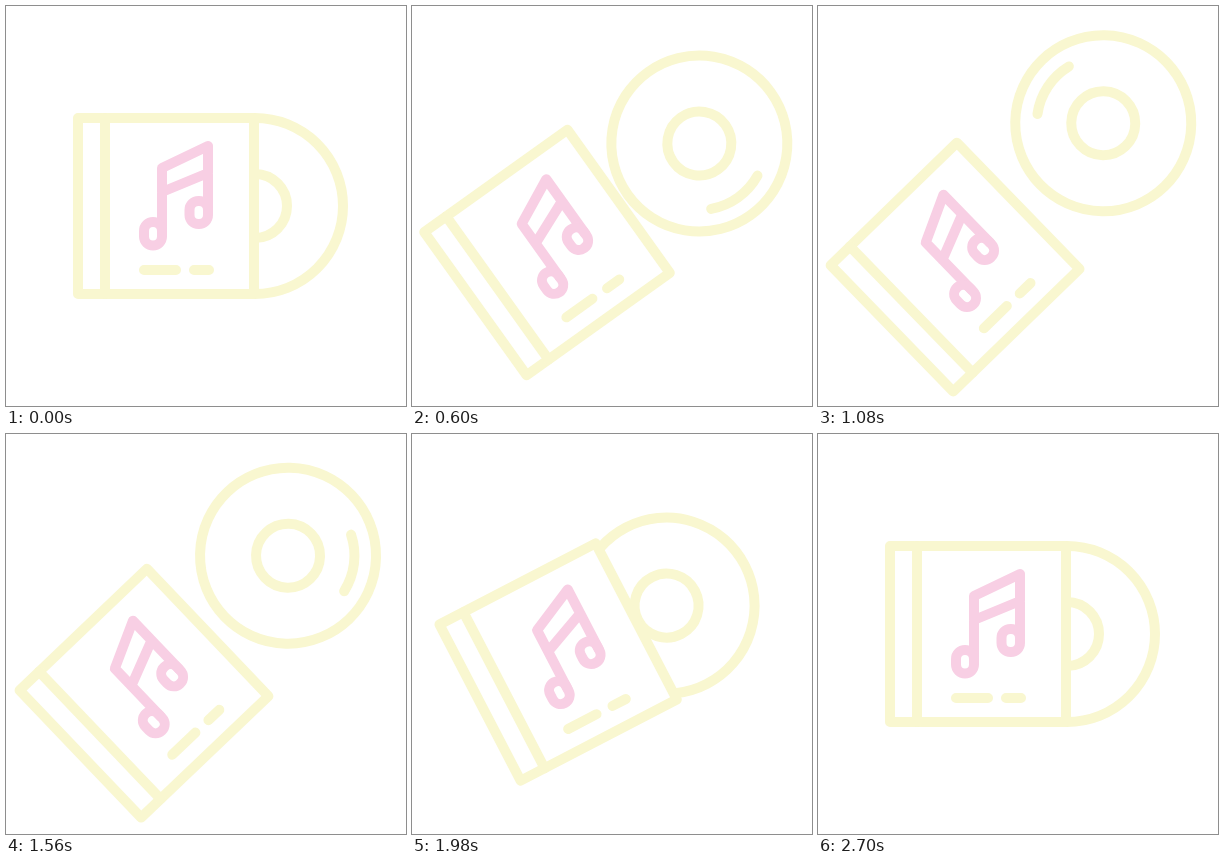
These frames come from a looping animation (400x400 px, 4.73 s). An HTML page:

```html
<!DOCTYPE html>
<html lang="en">
<head>
<meta charset="utf-8">
<title>Music album</title>
<style>
  html, body { margin: 0; height: 100%; overflow: hidden; background: #fff; }
  svg { display: block; width: 100vw; height: 100vh; }
  g { fill: none; stroke: #f9f7d0; stroke-width: 10; stroke-linecap: round; stroke-linejoin: round; }
  #note { stroke: #f8cfe4; }
</style>
</head>
<body>
<svg viewBox="0 0 400 400">
  <g id="album">
    <g id="disc">
      <circle r="88"/>
      <circle r="32"/>
      <path id="shine" d="M60-28.5A66.5 66.5 0 0 1 60 28.5"/>
    </g>
    <g id="box">
      <path fill="#fff" d="M-88-88H88V88H-88Z"/>
      <path d="M-61-88V88M-22 64H10M28 64H43"/>
      <g id="note">
        <path d="M-4 28V-38L42-60V7M-4-14L42-33"/>
        <rect x="-22" y="16" width="18" height="23.5" rx="9"/>
        <rect x="23.5" y="-5" width="18.5" height="23" rx="9"/>
      </g>
    </g>
  </g>
</svg>
<script>
const LOOP = 4730, STEP = 30, OPEN = 1350, SHUT = 2270, END = 2700;
const el = id => document.getElementById(id);
const [album, disc, shine, box] = ["album", "disc", "shine", "box"].map(el);

// Cubic Bezier easing with handles (a, 0) and (b, 1)
function ease(x, [a, b]) {
  let lo = 0, hi = 1, s;
  for (let i = 0; i < 24; i++) {
    s = (lo + hi) / 2;
    const r = 1 - s;
    if (3 * r * r * s * a + 3 * r * s * s * b + s ** 3 < x) lo = s; else hi = s;
  }
  return s * s * (3 - 2 * s);
}

// Rest, open, overshoot when closing, and the two easings
const angle = { rest: 0, open: -45, over: 3.6, out: [.27, .1], back: [.85, .86] };
const boxX = { rest: -40, open: -88.5, over: -51.5, out: [.2, .05], back: [.52, .6] };
const discX = { rest: 49, open: 120, over: 24, out: [.2, .05], back: [.51, .8] };

function value(m, t) {
  const move = (t0, t1, from, to, e) => from + (to - from) * ease((t - t0) / (t1 - t0), e);
  if (t <= 0 || t >= END) return m.rest;
  if (t < OPEN) return move(0, OPEN, m.rest, m.open, m.out);
  if (t < SHUT) return move(OPEN, SHUT, m.open, m.over, m.back);
  return move(SHUT, END, m.over, m.rest, [.27, .1]);
}

function draw(t) {
  const spin = -135 + 720 * (1 - Math.max(0, 1 - t / SHUT) ** 1.22);
  album.setAttribute("transform", `translate(200 200) rotate(${value(angle, t)})`);
  box.setAttribute("transform", `translate(${value(boxX, t)} 0)`);
  disc.setAttribute("transform", `translate(${value(discX, t)} 0)`);
  shine.setAttribute("transform", `rotate(${spin})`);
}

let start;
function tick(now) {
  start ??= now;
  draw(Math.floor((now - start) % LOOP / STEP) * STEP);
  requestAnimationFrame(tick);
}
draw(0);
requestAnimationFrame(tick);
</script>
</body>
</html>
```
